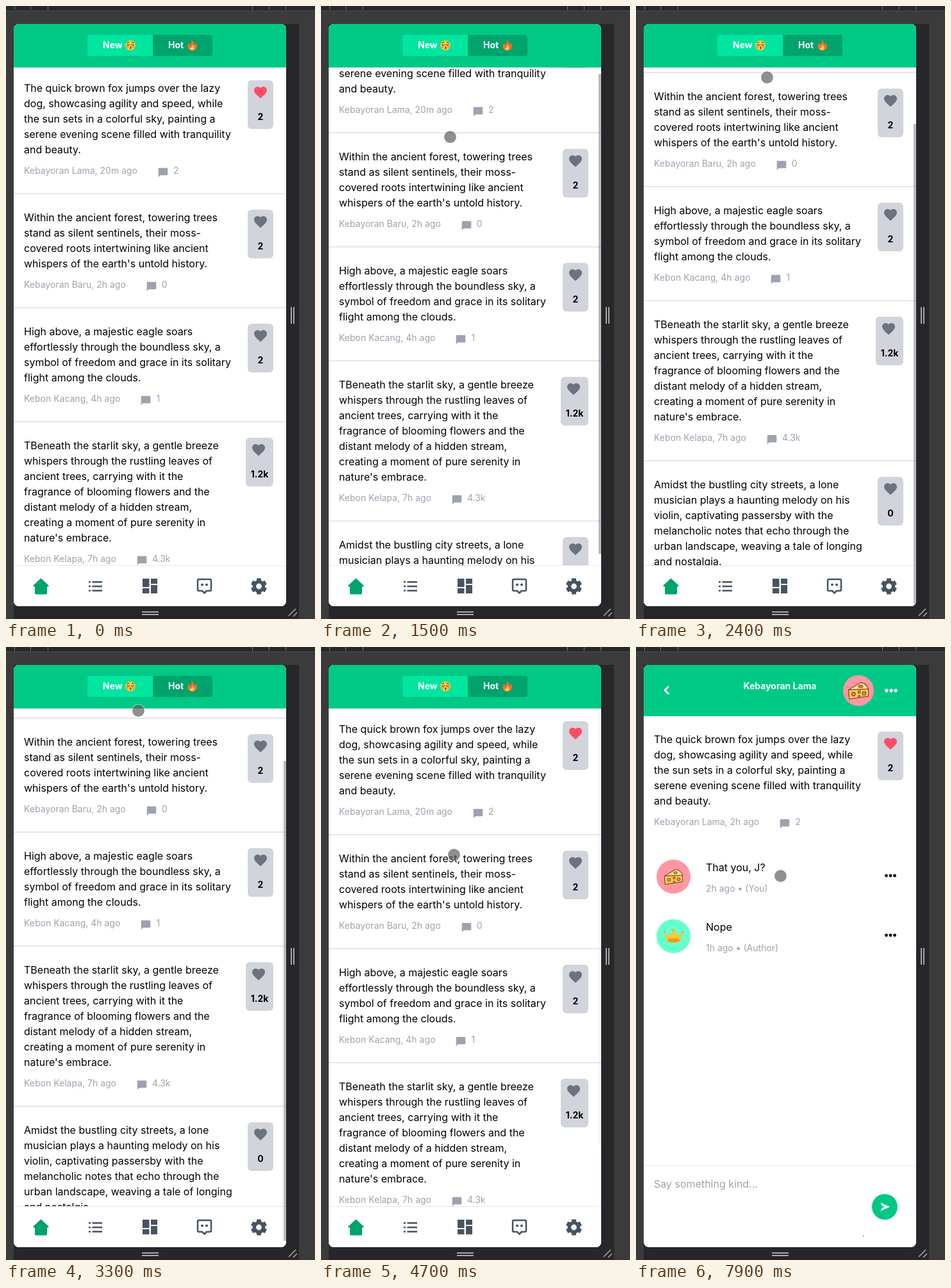
An HTML page for the animation above (8 s loop, 482x957 px).

```html
<!DOCTYPE html>
<html lang="en">
<head>
<meta charset="utf-8">
<title>Feed</title>
<style>
  html, body { margin: 0; width: 100%; height: 100%; overflow: hidden; background: #3b3b3b; }
  body { position: relative; font: 16px/24px Inter, sans-serif; color: #000; }
  svg { position: absolute; display: block; }
  .frame { left: 0; top: 0; }
  .screen { position: absolute; left: 12px; top: 28px; width: 425px; height: 909px; clip-path: inset(0 round 8px); background: #fff; }
  .page, .feed, .layer { position: absolute; left: 0; top: 0; width: 425px; height: 909px; }
  .feed { top: 64px; height: auto; }
  .detail-post { position: absolute; left: 0; top: 80px; width: 425px; }
  .post { position: relative; box-sizing: border-box; padding: 24px 16px 25px; border-bottom: 2px solid #e5e7eb; white-space: pre; }
  .detail-post .post { border: 0; }
  .meta { display: flex; margin-top: 11px; height: 20px; font-size: 14px; line-height: 20px; color: #9ca3af; }
  .meta svg { position: relative; top: 5px; margin: 0 8px 0 32px; flex: none; }
  .card { position: absolute; right: 20px; top: 24px; width: 40px; height: 76px; border-radius: 6px; background: #d1d5db; }
  .card.wide { width: 43px; }
  .card svg { left: 8px; top: 7px; }
  .card b { position: absolute; left: 0; right: 0; top: 47px; line-height: 20px; font-size: 14px; text-align: center; }
  .bar { position: absolute; right: 0; top: 0; width: 4px; height: 749px; }
  .label { font: 700 14px Inter, sans-serif; fill: #fff; }
  .small { font-size: 14px; fill: #9ca3af; }
  .pointer { position: absolute; width: 21px; height: 21px; margin: -10.5px; box-sizing: border-box; border-radius: 50%; background: rgba(90, 90, 90, .68) padding-box; border: 1px solid rgba(255, 255, 255, .5); }
</style>
</head>
<body>
<svg class="frame" width="482" height="957">
  <rect width="482" height="7" fill="#28282c"/>
  <path d="M0 7.5H482" stroke="#505052"/>
  <path d="M13.5 0v6M38.5 0v6M65.5 0v6M384.5 0v6M410.5 0v6M436.5 0v6" stroke="#77777a"/>
  <rect x="12" y="28" width="445" height="929" fill="#26262b"/>
  <path d="M12 952.5H437" stroke="#222226"/>
  <path d="M212 946h26M212 950h26M445 470v26M449 470v26" stroke="#a8a8aa" stroke-width="2"/>
  <path d="M441 952l11-11M448 953l6-6" stroke="#a4a4a6" stroke-width="1.7"/>
</svg>

<div class="screen">
  <div class="page" id="list">
    <div class="feed" id="feed"></div>
    <svg class="layer" viewBox="12 28 425 909">
      <path d="M12 873H437V937H12z" fill="#fff"/>
      <path d="M12 873.5H437" stroke="#e5e7eb"/>
      <path d="M54.5 894L66 904.5Q67 906 65 906H63.500V917Q63.500 918 62.500 918H46.500Q45.500 918 45.500 917V906H44Q42 906 43 904.500Z" fill="#00a36c" stroke="#00a36c" stroke-linejoin="round"/>
      <g fill="#465362" stroke="none">
        <path d="M129 898h3v2.500h-3zm0 6.800h3v2.500h-3zm0 6.800h3v2.500h-3zM134.500 898H150v2.500h-15.500zm0 6.800H150v2.500h-15.500zm0 6.800H150v2.500h-15.500z"/>
        <path d="M213 894h10.500v13H213zm0 15h10.500v8H213zm13-15h10v8h-10zm0 10h10v13h-10z"/>
        <path d="M301 895H318Q320 895 320 897V911Q320 913 318 913H313L309.500 916.500 306 913H301Q299 913 299 911V897Q299 895 301 895Z" fill="none" stroke="#465362" stroke-width="2.500" stroke-linejoin="round"/>
        <circle cx="306" cy="903.500" r="2"/><circle cx="313" cy="903.500" r="2"/>
        <g transform="translate(394.500 906)">
          <circle r="9.800"/>
          <g id="teeth"></g>
          <circle r="4.400" fill="#fff"/>
        </g>
      </g>
    </svg>
    <div class="bar" id="bar"></div>
    <svg class="layer" viewBox="12 28 425 909">
      <path d="M12 28H437V96H12z" fill="#00c985"/>
      <path d="M229 45H131a4 4 0 0 0-4 4V74a4 4 0 0 0 4 4H229z" fill="#00e5a0"/>
      <path d="M229 45H318a4 4 0 0 1 4 4V74a4 4 0 0 1-4 4H229z" fill="#00a36c"/>
      <text class="label" x="151" y="66">New</text>
      <text class="label" x="253" y="66">Hot</text>
      <g transform="translate(194 61.500)" fill="none" stroke="#5f3b18" stroke-width="1.200" stroke-linecap="round">
        <circle r="7.800" fill="#ffc83d" stroke="none"/>
        <circle cx="-4.600" cy="2.200" r="1.900" fill="#ff8f5c" stroke="none"/>
        <circle cx="4.800" cy="2.200" r="1.900" fill="#ff8f5c" stroke="none"/>
        <path d="M-5.200 -1.200q1.800 1.800 3.600 0M1.600 -1.200q1.800 1.800 3.600 0M-5 -4l2.500-.8M5 -4l-2.500-.8M-.3 2q2.200.5.4 1.600 2 .8-.4 1.900"/>
      </g>
      <path d="M289 53Q294 56 294 61Q296 60 295.500 57Q299 61 297.500 65Q296 69.500 290.500 69.500Q284 69 283.500 63.500Q283.300 60 286 57.500Q286.500 60 288 61Q290.500 57 289 53Z" fill="#ff6a2b"/>
      <path d="M290.500 60Q295 64 293.500 67Q292 69.500 289.500 69Q286 68 287 64.500Q288 65.500 289 65Q291 63 290.500 60Z" fill="#ffd04a"/>
    </svg>
  </div>

  <div class="page" id="detail">
    <div class="detail-post" id="detailPost"></div>
    <svg class="layer" viewBox="12 28 425 909">
      <defs>
        <g id="cheese" stroke="#79452b" stroke-linejoin="round">
          <path d="M-14 -1L3 -11Q11 -11 14 -2V8L-13 12Z" fill="#f8b23c"/>
          <path d="M-14 -1L3 -11Q11 -11 14 -2Z" fill="#ffe092"/>
          <path d="M-14 -1L14 -2V8L-13 12Z" fill="#ffc95a"/>
          <g fill="#e99a32">
            <circle cx="-7" cy="5" r="2.600"/><circle cx="1" cy="2" r="1.800"/>
            <circle cx="8" cy="4" r="2.500"/><circle cx="1" cy="8" r="1.400"/>
            <ellipse cx="3" cy="-6" rx="3" ry="1.600"/>
          </g>
        </g>
        <g id="dots"><circle cx="-6.500" r="2.400"/><circle r="2.400"/><circle cx="6.500" r="2.400"/></g>
      </defs>
      <path d="M12 28H437V108H12z" fill="#00c985"/>
      <path d="M51 61.500L45 67.500L51 73.500" fill="none" stroke="#fff" stroke-width="2.800"/>
      <text class="label" x="224.500" y="66" text-anchor="middle">Kebayoran Lama</text>
      <use href="#dots" transform="translate(398 68) scale(1.100)" fill="#fff"/>
      <path d="M12 809.500H437" stroke="#e5e7eb"/>
      <text x="28" y="844" fill="#9ca3af">Say something kind...</text>
      <circle cx="388" cy="874" r="20" fill="#00c985"/>
      <path d="M381.500 867.500L396 874L381.500 880.500L384 875.200L389 874L384 872.800Z" fill="#fff"/>
      <path d="M354 919h1v1h-1z"/>
      <g id="loaded">
        <circle cx="347" cy="68" r="24" fill="#ff96a4"/>
        <use href="#cheese" transform="translate(347 68) scale(1.100)"/>
        <circle cx="58.500" cy="358.500" r="26.500" fill="#ff96a4"/>
        <use href="#cheese" transform="translate(58.500 358.500)"/>
        <text x="109" y="350">That you, J?</text>
        <text class="small" x="109" y="382">2h ago • (You)</text>
        <use href="#dots" x="397" y="357"/>
        <circle cx="58.500" cy="451.500" r="26.500" fill="#66ffd0"/>
        <g transform="translate(58.500 451.500)">
          <path d="M-14 -6L-7 0L0 -10L7 0L14 -6L10.500 8Q0 13 -10.500 8Z" fill="#ffc52e"/>
          <ellipse cy="6.500" rx="9.500" ry="3" fill="#ef9420"/>
          <g fill="#ffb020"><circle cx="-13.500" cy="-6" r="1.800"/><circle cy="-9.500" r="2"/><circle cx="13.500" cy="-6" r="1.800"/></g>
        </g>
        <text x="109" y="443">Nope</text>
        <text class="small" x="109" y="475">1h ago • (Author)</text>
        <use href="#dots" x="397" y="450"/>
      </g>
    </svg>
  </div>
</div>
<div class="pointer" id="pointer"></div>

<script>
const $ = id => document.getElementById(id);
const LOOP = 8000, STEP = 100;

const fox = `The quick brown fox jumps over the lazy
dog, showcasing agility and speed, while
the sun sets in a colorful sky, painting a
serene evening scene filled with tranquility
and beauty.`;
const posts = [
  { text: fox, meta: 'Kebayoran Lama, 20m ago', replies: '2', likes: '2', liked: true },
  { text: `Within the ancient forest, towering trees
stand as silent sentinels, their moss-
covered roots intertwining like ancient
whispers of the earth's untold history.`, meta: 'Kebayoran Baru, 2h ago', replies: '0', likes: '2' },
  { text: `High above, a majestic eagle soars
effortlessly through the boundless sky, a
symbol of freedom and grace in its solitary
flight among the clouds.`, meta: 'Kebon Kacang, 4h ago', replies: '1', likes: '2' },
  { text: `TBeneath the starlit sky, a gentle breeze
whispers through the rustling leaves of
ancient trees, carrying with it the
fragrance of blooming flowers and the
distant melody of a hidden stream,
creating a moment of pure serenity in
nature's embrace.`, meta: 'Kebon Kelapa, 7h ago', replies: '4.3k', likes: '1.2k' },
  { text: `Amidst the bustling city streets, a lone
musician plays a haunting melody on his
violin, captivating passersby with the
melancholic notes that echo through the
urban landscape, weaving a tale of longing
and nostalgia.`, meta: 'Kebon Jeruk, 9h ago', replies: '0', likes: '0' }
];

const bubble = `<svg width="16" height="16" viewBox="1 1 22 22"><path fill="#9ca3af"
  d="M20 2H4c-1.100 0-2 .9-2 2v18l4-4h14c1.100 0 2-.9 2-2V4c0-1.100-.9-2-2-2z"/></svg>`;
const heart = color => `<svg width="24" height="24"><path fill="${color}"
  d="M12 21.350l-1.450-1.320C5.400 15.360 2 12.280 2 8.500 2 5.420 4.420 3 7.500 3c1.740 0 3.410.81 4.500 2.090C13.090 3.810 14.760 3 16.500 3 19.580 3 22 5.420 22 8.500c0 3.780-3.400 6.860-8.550 11.540z"/></svg>`;
const postHtml = p => `<div class="post"><div>${p.text}</div><div class="meta"><span>${p.meta}</span>${bubble}<span>${p.replies}</span></div><div class="card ${p.likes.length > 1 ? 'wide' : ''}">${heart(p.liked ? '#ff4d67' : '#6b7280')}<b>${p.likes}</b></div></div>`;

$('feed').innerHTML = posts.map(postHtml).join('');
$('detailPost').innerHTML = postHtml({ ...posts[0], meta: 'Kebayoran Lama, 2h ago' });
$('teeth').innerHTML = [0, 60, 120].map(a =>
  `<rect x="-3.500" y="-12.500" width="7" height="25" rx="1" transform="rotate(${a})"/>`).join('');

// Each key is [time, ...values], joined linearly.
const scrollKeys = [[1000, 0], [1100, 10], [1500, 95], [1900, 146], [2000, 166], [2400, 189],
  [3200, 189], [3300, 182], [4250, 0]];
const barKeys = [[1000, 0], [1100, 1], [2900, 1], [3000, 0], [3200, 0], [3300, 1], [4500, 1], [4700, .1], [4800, 0]];
const pointerKeys = [[700, 118, 213], [800, 165, 270], [900, 206, 311], [1000, 206, 311],
  [1100, 204, 290], [1500, 201.5, 204.5], [1900, 201.5, 154], [2000, 201.5, 134.5], [2400, 204.5, 111],
  [2900, 204.5, 111], [3000, 205, 89], [3200, 205, 89], [3300, 206.5, 99.5], [4250, 207, 281],
  [4500, 207.5, 328], [4700, 207.5, 324.5], [5000, 178.5, 217], [5100, 175.5, 208.5], [6100, 175.5, 209.5],
  [6200, 173, 213], [6500, 182, 240], [6800, 208.5, 275.5], [7800, 208.5, 275.5], [7900, 225.5, 357.5]];

function at(keys, t) {
  const i = keys.findIndex(k => k[0] > t);
  if (i === 0) return keys[0].slice(1);
  if (i < 0) return keys[keys.length - 1].slice(1);
  const a = keys[i - 1], b = keys[i], u = (t - a[0]) / (b[0] - a[0]);
  return a.slice(1).map((v, n) => v + (b[n + 1] - v) * u);
}
const show = (id, on) => { $(id).style.visibility = on ? 'inherit' : 'hidden'; };

function draw() {
  const t = Math.floor(performance.now() % LOOP / STEP) * STEP;
  const scroll = Math.round(at(scrollKeys, t)[0]);
  const [x, y] = at(pointerKeys, t);
  $('feed').style.top = `${64 - scroll}px`;
  $('bar').style.top = `${Math.round(scroll * 749 / 909)}px`;
  $('bar').style.background = `rgba(0, 0, 0, ${.27 * at(barKeys, t)[0]})`;
  $('pointer').style.left = `${x}px`;
  $('pointer').style.top = `${y}px`;
  show('pointer', t >= 700);
  show('list', t < 5300);
  show('detail', t >= 5300);
  show('loaded', t >= 5400);
  requestAnimationFrame(draw);
}
draw();
</script>
</body>
</html>
```
